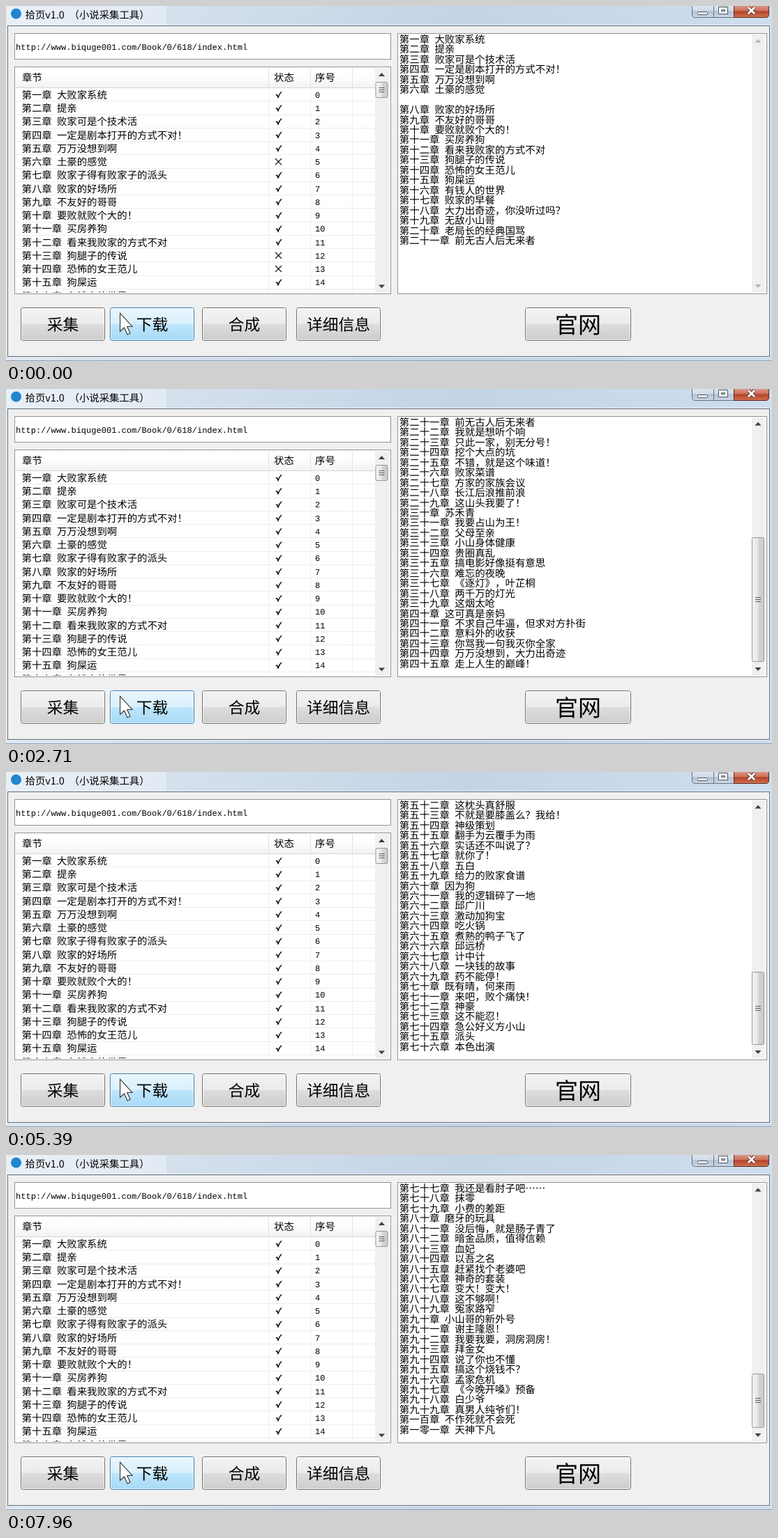
Animation of 1098 by 510 pixels, one loop 8030 ms. Source, as an HTML page:

```html
<!DOCTYPE html>
<html lang="zh-CN">
<head>
<meta charset="utf-8">
<title>小说采集工具</title>
<style>
html, body { margin: 0; width: 100%; height: 100%; overflow: hidden; }
svg { display: block; width: 1098px; height: 510px; }
text {
  font-family: "Noto Sans CJK SC", "Noto Sans CJK", sans-serif;
  font-weight: 500;
  text-rendering: geometricPrecision;
  text-spacing-trim: space-all;
  white-space: pre;
}
.mono { font-family: "Liberation Mono", monospace; }
.big { font-weight: 400; }
</style>
</head>
<body>
<svg id="stage" viewBox="0 0 1098 510" lang="zh-CN">
  <defs>
    <linearGradient id="bar"><stop offset="0" stop-color="#dfe8f2"/><stop offset=".25" stop-color="#d3dfec"/><stop offset=".6" stop-color="#c3d4e6"/><stop offset="1" stop-color="#cfdeee"/></linearGradient>
    <linearGradient id="gray" x2="0" y2="1"><stop offset="0" stop-color="#f3f3f3"/><stop offset=".49" stop-color="#ebebeb"/><stop offset=".5" stop-color="#dddddd"/><stop offset="1" stop-color="#cdcdcd"/></linearGradient>
    <linearGradient id="blue" x2="0" y2="1"><stop offset="0" stop-color="#eaf6fd"/><stop offset=".49" stop-color="#d9f0fc"/><stop offset=".5" stop-color="#bee6fd"/><stop offset="1" stop-color="#a7d9f5"/></linearGradient>
    <linearGradient id="head" x2="0" y2="1"><stop offset="0" stop-color="#fff"/><stop offset=".5" stop-color="#fdfdfd"/><stop offset="1" stop-color="#f1f2f4"/></linearGradient>
    <linearGradient id="thumb"><stop offset="0" stop-color="#f5f5f5"/><stop offset=".5" stop-color="#e6e6e6"/><stop offset=".52" stop-color="#d6d6d6"/><stop offset="1" stop-color="#cacaca"/></linearGradient>
    <linearGradient id="ctl" x2="0" y2="1"><stop offset="0" stop-color="#dfe7f0"/><stop offset=".45" stop-color="#d0dae6"/><stop offset=".5" stop-color="#b4c2d2"/><stop offset="1" stop-color="#cbd8e6"/></linearGradient>
    <linearGradient id="red" x2="0" y2="1"><stop offset="0" stop-color="#dc9a8b"/><stop offset=".45" stop-color="#cd7059"/><stop offset=".5" stop-color="#b5402a"/><stop offset="1" stop-color="#cf7350"/></linearGradient>
    <clipPath id="listClip"><rect x="13" y="88" width="516" height="323.5"/></clipPath>
  </defs>
</svg>
<script>
const LOOP = 8030;
const EM = 14.45;
const VISIBLE = 25;

const titles = `大败家系统 提亲 败家可是个技术活 一定是剧本打开的方式不对！ 万万没想到啊
土豪的感觉 败家子得有败家子的派头 败家的好场所 不友好的哥哥 要败就败个大的！
买房养狗 看来我败家的方式不对 狗腿子的传说 恐怖的女王范儿 狗屎运
有钱人的世界 败家的早餐 大力出奇迹，你没听过吗？ 无敌小山哥 老局长的经典国骂
前无古人后无来者 我就是想听个响 只此一家，别无分号！ 挖个大点的坑 不错，就是这个味道！
败家菜谱 方家的家族会议 长江后浪推前浪 这山头我要了！ 苏禾青
我要占山为王！ 父母至亲 小山身体健康 贵圈真乱 搞电影好像挺有意思
难忘的夜晚 《逐灯》，叶芷桐 两千万的灯光 这烟太呛 这可真是亲妈
不求自己牛逼，但求对方扑街 意料外的收获 你骂我一句我灭你全家 万万没想到，大力出奇迹 走上人生的巅峰！
小山居然脸红了 演唱会开始 超级败家子 激光电影 同志，你辛苦了！
大制作 这枕头真舒服 不就是要膝盖么？我给！ 神级策划 翻手为云覆手为雨
实话还不叫说了？ 就你了！ 五白 给力的败家食谱 因为狗
我的逻辑碎了一地 邱广川 激动加狗宝 吃火锅 煮熟的鸭子飞了
邱远桥 计中计 一块钱的故事 药不能停！ 既有晴，何来雨
来吧，败个痛快！ 神豪 这不能忍！ 急公好义方小山 派头
本色出演 我还是看肘子吧…… 抹零 小费的差距 磨牙的玩具
没后悔，就是肠子青了 暗金品质，值得信赖 血妃 以吾之名 赶紧找个老婆吧
神奇的套装 变大！变大！ 这不够啊！ 冤家路窄 小山哥的新外号
谢主隆恩！ 我要我要，洞房洞房！ 拜金女 说了你也不懂 搞这个烧钱不？
孟家危机 《今晚开嗓》预备 白少爷 真男人纯爷们！ 不作死就不会死 天神下凡`.split(/\s+/);

// Bursts of downloads: start, end, lines gained at each step
const bursts = [
  [70, 300, '1121'], [610, 680, '11'], [910, 1000, '11'], [1160, 1160, '1'],
  [1310, 1310, '1'], [1460, 1460, '1'], [1630, 1930, '22111'], [2160, 2240, '11'],
  [2560, 2790, '1111'], [2940, 2940, '1'], [3170, 3410, '1111'], [3580, 3810, '2121'],
  [4040, 4830, '21121121121'], [4980, 4980, '1'], [5150, 5220, '11'], [5390, 5540, '111'],
  [5770, 5770, '1'], [5920, 5920, '1'], [6090, 6550, '1111111'], [6780, 7250, '1111111'],
  [7570, 7960, '211111']
];
const steps = bursts.flatMap(([from, to, gains]) => [...gains].map((g, i) => ({
  at: Math.floor((from + (to - from) * i / Math.max(1, gains.length - 1)) / 10) * 10,
  gain: +g
})));

const late = { 5: 680, 12: 70, 13: 230 };  // rows ticked after the loop starts
const lateLine = { index: 6, at: 150 };

const stage = document.getElementById('stage');

function add(tag, attrs, parent = stage, content) {
  const node = document.createElementNS('http://www.w3.org/2000/svg', tag);
  for (const key in attrs) node.setAttribute(key, attrs[key]);
  if (content !== undefined) node.textContent = content;
  return parent.appendChild(node);
}
const rect = (x, y, width, height, fill, more, parent) =>
  add('rect', { x, y, width, height, fill, ...more }, parent);
const path = (d, more, parent) => add('path', { d, fill: 'none', ...more }, parent);
const label = (x, mid, size, content, more, parent) =>
  add('text', { x, y: mid + size * 0.38, 'font-size': size, ...more }, parent, content);

function numeral(n) {
  const digit = '零一二三四五六七八九';
  if (n === 100) return '一百';
  if (n > 100) return '一零' + digit[n - 100];
  const tens = Math.floor(n / 10);
  return (tens > 1 ? digit[tens] : '') + (tens ? '十' : '') + (n % 10 ? digit[n % 10] : '');
}

// A chapter line: heading, half-width gap, title
function chapter(x, mid, size, parent) {
  const head = label(x, mid, size, '', {}, parent);
  const body = label(x, mid, size, '', {}, parent);
  return index => {
    const show = index >= 0;
    const text = show ? `第${numeral(index + 1)}章` : '';
    head.textContent = text;
    body.textContent = show ? titles[index] : '';
    body.setAttribute('x', x + (text.length + 0.5) * size);
  };
}

function button(x, w, text, size, hot) {
  rect(x + .5, 433.5, w, 47, hot ? 'url(#blue)' : 'url(#gray)', { rx: 3, stroke: hot ? '#3c7fb1' : '#707070' });
  rect(x + 1.5, 434.5, w - 2, 45, 'none', { rx: 2, stroke: '#fff', 'stroke-opacity': .7 });
  label(x + .5 + w / 2, 457.5, size, text, { 'text-anchor': 'middle', class: 'big' });
}

function thumb(x) {
  const g = add('g', {});
  const box = rect(x + .5, 0, 17, 0, 'url(#thumb)', { rx: 2, stroke: '#979797' }, g);
  const grip = path('', { stroke: '#5a5a5a' }, g);
  return (top, height) => {
    const mid = Math.round(top + height / 2);
    box.setAttribute('y', top + .5);
    box.setAttribute('height', height - 1);
    grip.setAttribute('d', [-3.5, -.5, 2.5].map(d => `M${x + 5} ${mid + d}h8`).join(''));
  };
}

const arrows = (x, up, down) => path(
  `M${x - 4.5} ${up + 2.5}l4.5 -5l4.5 5zM${x - 4.5} ${down - 2.5}l4.5 5l4.5 -5z`, { fill: '#404040' });

// Window frame
rect(0, 0, 1098, 510, 'url(#bar)');
rect(0, 0, 230, 27, '#fff', { opacity: .3 });
rect(2.5, 28.5, 1092, 475, '#f0f0f0', { stroke: '#5f6a76' });
path('M1.5 27.5H1095.5V504.5H1.5Z', { stroke: '#e9f0f7' });
path('M0 509.5H1098', { stroke: '#8fa3b8' });
add('circle', { cx: 14.5, cy: 11, r: 7.5, fill: '#1f86cf' });
label(27.5, 13, 14.4, '拾页v1.0');
label(90.5, 13, 14.4, '（小说采集工具）');

// Window controls
path('M983.5 -1V12q0 4.500 4.500 4.500H1043.500V-1Z', { fill: 'url(#ctl)', stroke: '#65727f' });
path('M1043.500 -1V16.500H1089q4.500 0 4.500 -4.500V-1Z', { fill: 'url(#red)', stroke: '#5c2a22' });
path('M1014.500 0V16', { stroke: '#65727f' });
rect(991.5, 8.5, 14, 4, '#fff', { stroke: '#4b5560', rx: 1 });
path('M1021.500 1.500h13v10h-13zM1025.500 5.500h5v2h-5z', { fill: '#fff', 'fill-rule': 'evenodd', stroke: '#4b5560' });
for (const [stroke, w] of [['#5a3834', 5], ['#fff', 3]])
  path('M1064 2l9 9M1073 2l-9 9', { stroke, 'stroke-width': w });

// Panels
const panel = (x, y, w, h) => rect(x + .5, y + .5, w, h, '#fff', { stroke: '#8e949c' });
panel(12, 39, 539, 37);
panel(12, 87, 539, 326);
panel(561, 39, 529, 374);
label(14, 58, 12.04, 'http://www.biquge001.com/Book/0/618/index.html', { class: 'mono' });

// Chapter table
const list = add('g', { 'clip-path': 'url(#listClip)' });
rect(14, 89, 515, 28, 'url(#head)', {}, list);
path('M14 117.500H529', { stroke: '#d5d5d5' }, list);
path('M376.500 89V117M436.500 89V117M496.500 89V117', { stroke: '#dfe1e4' }, list);
path('M376.500 118V412M436.500 118V412M496.500 118V412', { stroke: '#ededed' }, list);
[[23, '章节'], [384, '状态'], [443, '序号']].forEach(([x, s]) => label(x, 103, 14.4, s, {}, list));

const marks = [];
for (let i = 0; i < 16; i++) {
  const mid = 127.3 + i * 19.25;
  path(`M14 ${Math.round(mid + 9) + .5}H529`, { stroke: '#ededed' }, list);
  chapter(22.5, mid, 14.4, list)(i);
  label(443, mid, 12.04, i, { class: 'mono' }, list);
  const at = `translate(390.5 ${mid})`;
  marks.push({
    tick: path('M-3.500 1L-2 .2L-.5 4Q1.500 -1.500 4.500 -4', { stroke: '#000', 'stroke-width': 1.4, transform: at }, list),
    cross: path('M-4.500 -4.500l9 9M4.500 -4.500l-9 9', { stroke: '#000', 'stroke-width': 1.2, transform: at }, list)
  });
}
rect(529, 89, 20, 323, '#f0f0f0');
arrows(538.5, 98.5, 403);
thumb(529.5)(109, 23);

// Output pane
const lines = Array.from({ length: VISIBLE }, (_, i) => chapter(563.8, 47.5 + i * EM, EM));
rect(1069, 41, 18.5, 371, '#f0f0f0');
const outArrows = arrows(1078, 50, 402.5);
const outThumb = thumb(1069);
const outThumbGroup = stage.lastChild;

// Buttons and pointer
button(21, 120, '采集', 22.8);
button(149, 120, '下载', 22.8, true);
button(281, 120, '合成', 22.8);
button(416, 120, '详细信息', 22.8);
button(744, 151, '官网', 33);
path('M163.500 441.500V467.500L169.500 462L174 472L178 470.200L173.700 460.500H181Z', { fill: '#fff', stroke: '#333', 'stroke-width': 1.1 });

let shown = -1;
function render(t) {
  const done = steps.filter(s => s.at <= t);
  if (done.length === shown) return;
  shown = done.length;

  const total = done.reduce((sum, s) => sum + s.gain, 21);
  const first = Math.max(0, total - VISIBLE);
  lines.forEach((set, i) => {
    const index = first + i;
    const empty = index >= total || (index === lateLine.index && t < lateLine.at);
    set(empty ? -1 : index);
  });

  marks.forEach(({ tick, cross }, i) => {
    const ok = t >= (late[i] || 0);
    tick.setAttribute('visibility', ok ? 'visible' : 'hidden');
    cross.setAttribute('visibility', ok ? 'hidden' : 'visible');
  });

  const scrolls = total > VISIBLE;
  const height = Math.round(8224 / total - 3.4);
  outThumbGroup.setAttribute('visibility', scrolls ? 'visible' : 'hidden');
  outArrows.setAttribute('fill', scrolls ? '#404040' : '#b4b4b4');
  outThumb(392 - height, height);
}

const begin = performance.now();
function frame() {
  render((performance.now() - begin) % LOOP);
  requestAnimationFrame(frame);
}
render(0);
requestAnimationFrame(frame);
</script>
</body>
</html>
```
